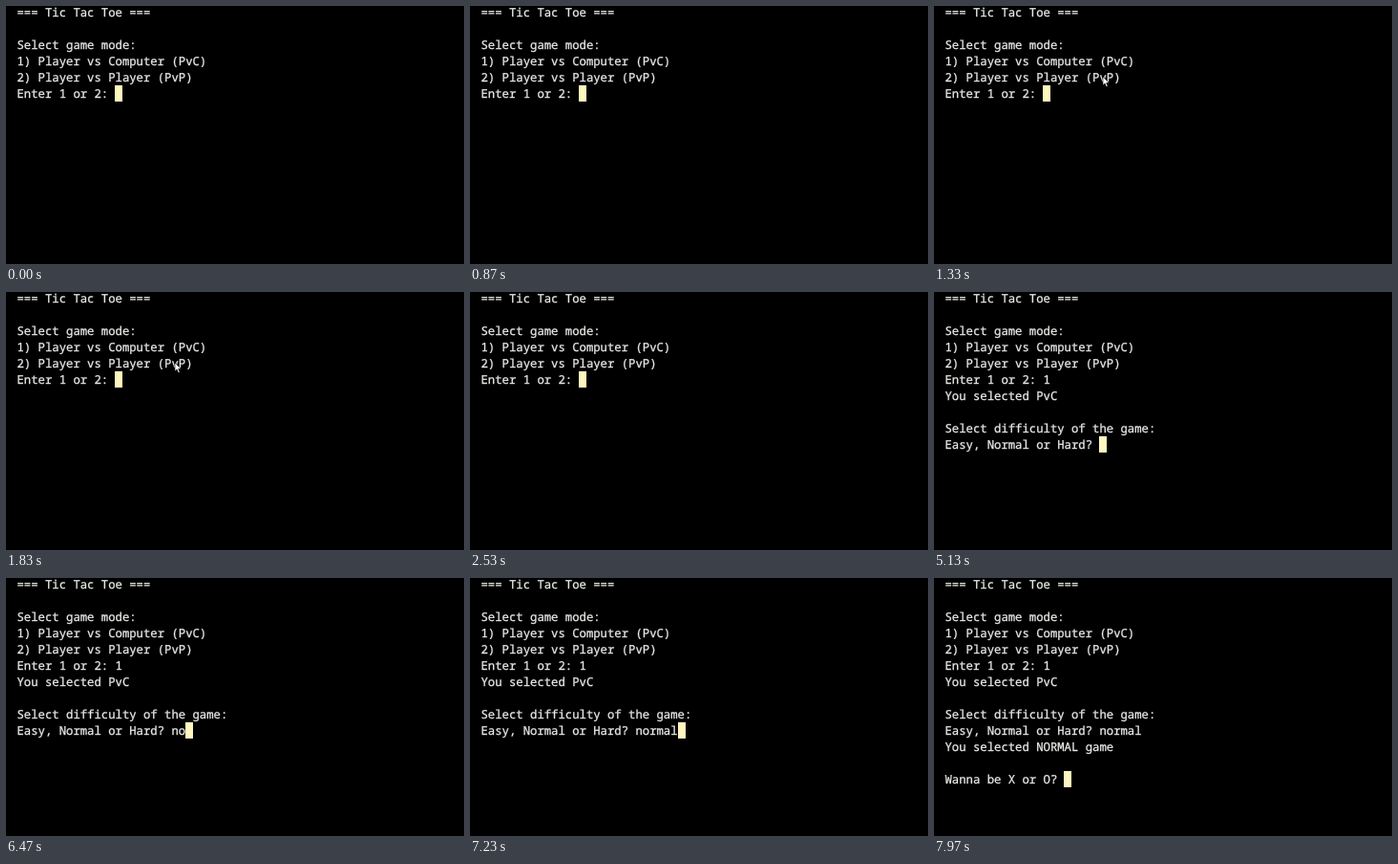
Animation, 480 px wide and 270 px high, one loop 8000 ms. Source, as an HTML page:

```html
<!DOCTYPE html>
<html lang="en">
<head>
<meta charset="utf-8">
<title>Tic Tac Toe</title>
<style>
  html, body { margin: 0; width: 100%; height: 100%; overflow: hidden; background: #000; }
  #stage { position: relative; width: 480px; height: 270px; overflow: hidden; background: #000; }
  #screen {
    position: absolute; left: 11.5px; top: -2.3px; margin: 0;
    font: 12.28px/17px "Noto Sans Mono", "DejaVu Sans Mono", monospace;
    font-variant-ligatures: none;
    text-rendering: geometricPrecision;
    color: #e8ebe6;
    -webkit-text-stroke: .3px #e8ebe6;
  }
  #caret { position: absolute; left: 0; top: 0; width: 8px; height: 17px; background: #fff6c0; }
  #pointer {
    position: absolute; left: 0; top: 0; width: 8px; height: 12px; overflow: visible;
    animation: drift 8s linear infinite;
  }
  /* The pointer dips in from the top edge, rests, and leaves again. */
  @keyframes drift {
    0%, 13% { transform: translate(205px, -14px); animation-timing-function: ease-out; }
    16.3%, 23% { transform: translate(177px, 74px); animation-timing-function: ease-in; }
    27%, 100% { transform: translate(195px, -14px); }
  }
</style>
</head>
<body>
<div id="stage">
  <div id="caret"></div>
  <pre id="screen"></pre>
  <svg id="pointer" viewBox="0 0 8 12">
    <path d="M0 0V9L2.1 7.1L3.6 10.6L5.2 9.9L3.7 6.5H6.6Z" fill="#fff" stroke="#000" stroke-width=".6"/>
  </svg>
</div>
<script>
  const LOOP = 8000, CELL = 7.368, ROW = 17, LEFT = 11.2;
  const screen = document.getElementById('screen');
  const caret = document.getElementById('caret');

  const menu = `=== Tic Tac Toe ===

Select game mode:
1) Player vs Computer (PvC)
2) Player vs Player (PvP)
Enter 1 or 2: `;
  const difficulty = `
You selected PvC

Select difficulty of the game:
Easy, Normal or Hard? `;
  const side = `
You selected NORMAL game

Wanna be X or O? `;

  // [time in ms, text appended]
  const output = [
    [0, menu], [3850, '1'], [4700, difficulty],
    [6130, 'n'], [6320, 'o'], [6560, 'r'], [6740, 'm'], [6900, 'a'], [7080, 'l'],
    [7700, side]
  ];

  let shown = null;
  function render(time) {
    const text = output.filter(([at]) => at <= time).map(([, part]) => part).join('');
    if (text === shown) return;
    shown = text;
    screen.textContent = text;
    const lines = text.split('\n');
    const row = lines.length - 1;
    const x = Math.round(LEFT + lines[row].length * CELL);
    caret.style.transform = `translate(${x}px, ${row * ROW - 2}px)`;
  }

  const drift = document.getElementById('pointer').getAnimations()[0];
  drift.pause();
  const start = performance.now();
  function frame() {
    const time = (performance.now() - start) % LOOP;
    render(time);
    drift.currentTime = time;
    requestAnimationFrame(frame);
  }
  frame();
</script>
</body>
</html>
```
